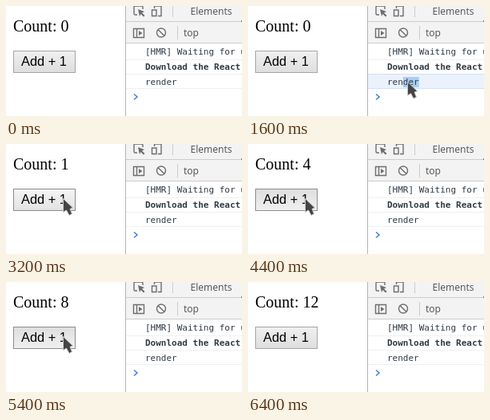
Write an HTML page that moves like this. It is 295 px wide and 138 px high and loops after 7000 ms.

```html
<!DOCTYPE html>
<html lang="en">
<head>
<meta charset="utf-8">
<title>Counter and console</title>
<style>
html, body { margin: 0; width: 100%; height: 100%; overflow: hidden; background: #fff; }
svg { display: block; }
text { white-space: pre; }
.page { font: 20px "Liberation Serif", serif; }
.label { font: 16.4px "Liberation Sans", sans-serif; }
.ui { font: 12px "Noto Sans", sans-serif; fill: #5a5a5a; }
.log { font: 11px "DejaVu Sans Mono", monospace; fill: #303942; }
.bold { font-weight: bold; }
.icon { fill: none; stroke: #6e6e6e; stroke-width: 1.4; }
</style>
</head>
<body>
<svg width="295" height="138" viewBox="0 0 295 138">
  <defs>
    <linearGradient id="idle" x2="0" y2="1"><stop stop-color="#f0f0f0"/><stop offset="1" stop-color="#dedede"/></linearGradient>
    <linearGradient id="hover" x2="0" y2="1"><stop stop-color="#f5f5f5"/><stop offset="1" stop-color="#e2e2e2"/></linearGradient>
    <linearGradient id="down" x2="0" y2="1"><stop stop-color="#dedede"/><stop offset="1" stop-color="#f0f0f0"/></linearGradient>
  </defs>

  <text id="count" class="page" x="9" y="32"></text>
  <rect id="button" x="9.5" y="56.5" width="77" height="27"/>
  <text class="label" x="19" y="75">Add + 1</text>

  <path fill="#f3f3f3" d="M149 0h146v46H149z"/>
  <path fill="none" stroke="#f0f0f0" d="M150 67.5H295M150 85.5H295M150 103.5H295"/>
  <rect id="row" x="149.5" y="85.5" width="147" height="18" fill="#ebf2fc" stroke="#d3e0f5"/>
  <path fill="none" stroke="#ccc" d="M150 19.5H295M150 46.5H295M208.5 0V14M214.5 25V42"/>
  <path fill="none" stroke="#b4b4b4" d="M149.5 0V138"/>
  <path fill="#4a80d9" d="M294 18h1v2h-1z"/>

  <path class="icon" d="M164 11H161.5Q160 11 160 9.5V1.5Q160 0 161.5 0H169.5Q171 0 171 1.5V4"/>
  <path fill="#6e6e6e" d="M165 4l8 3-3 1.5 3.5 3.5-1.5 1.5-3.5-3.5-1.5 3z"/>
  <path class="icon" d="M185.5 3V0H194V12.5H190M182.5 5H188V12.5H182.5z"/>
  <path class="icon" d="M159.5 28.5H172.5V39.5H159.5zM163.5 28.5V39.5"/>
  <path fill="#6e6e6e" d="M166 31l4.5 3-4.5 3z"/>
  <path class="icon" d="M188.5 33.5a5.5 5.5 0 1 1 11 0a5.5 5.5 0 1 1-11 0M190.200 29.7l7.6 7.6"/>
  <text class="ui" x="230.5" y="11">Elements</text>
  <text class="ui" x="222" y="38">top</text>

  <rect id="selection" y="89" height="13" fill="#aacdf3"/>
  <text class="log" x="174" y="61">[HMR] Waiting for update</text>
  <text class="log bold" x="174" y="80">Download the React</text>
  <text class="log" x="174" y="99">render</text>
  <path fill="none" stroke="#4a80d9" stroke-width="1.6" d="M160 110.5l4 3.5-4 3.5"/>

  <path id="cursor" fill="#444" stroke="#ccc" d="M.5.5V17.5L4.5 15 8 21.5 11.5 19.500 9 13.500 12.500 12z"/>
</svg>
<script>
const $ = id => document.getElementById(id);
const set = (id, attrs) => Object.entries(attrs).forEach(([k, v]) => $(id).setAttribute(k, v));
const within = (t, from, to) => t >= from && t < to;

// Places where the pointer rests: x, y, arrival and departure in ms.
const stops = [
  [212, 102, 600, 600],
  [200, 101, 800, 1100],
  [213, 95, 1300, 1400],
  [171, 94, 2000, 2000],
  [176, 93, 2200, 2500],
  [71, 68, 3000, 6200],
  [62, 53, 6300, 6300]
];

function pointer(t) {
  const i = Math.max(0, stops.findLastIndex(s => s[2] <= t));
  const [x, y, , leave] = stops[i];
  const [nx, ny, arrive] = stops[i + 1] || [x, y, Infinity];
  const k = Math.max(0, (t - leave) / (arrive - leave));
  return [x + (nx - x) * k, y + (ny - y) * k];
}

// Twelve clicks between 3200 and 6100 ms, slowly speeding up.
function clicks(t) {
  if (t < 3200) return 0;
  return 1 + Math.floor(11 * Math.min(1, (t - 3200) / 2900) ** 1.163);
}

function draw(now) {
  const t = Math.floor(now % 7000 / 100) * 100;
  const [x, y] = pointer(t);
  set("cursor", { transform: `translate(${x} ${y})`, visibility: within(t, 600, 6400) ? "visible" : "hidden" });

  // The selection runs from the letter under the pointer to the end of the word.
  const letter = within(t, 1500, 2400) ? Math.max(0, Math.floor((x - 174) / 6.62)) : 6;
  set("selection", { x: 174 + letter * 6.62, width: (6 - letter) * 6.62 });
  set("row", { visibility: within(t, 1200, 3200) ? "visible" : "hidden" });

  const count = clicks(t);
  const over = within(t, 3000, 6300);
  const down = t > 3600 && clicks(t + 100) > count;
  $("count").textContent = "Count: " + count;
  set("button", { fill: `url(#${down ? "down" : over ? "hover" : "idle"})`, stroke: over ? "#8c8c8c" : "#a6a6a6" });
  requestAnimationFrame(draw);
}
draw(performance.now());
</script>
</body>
</html>
```
